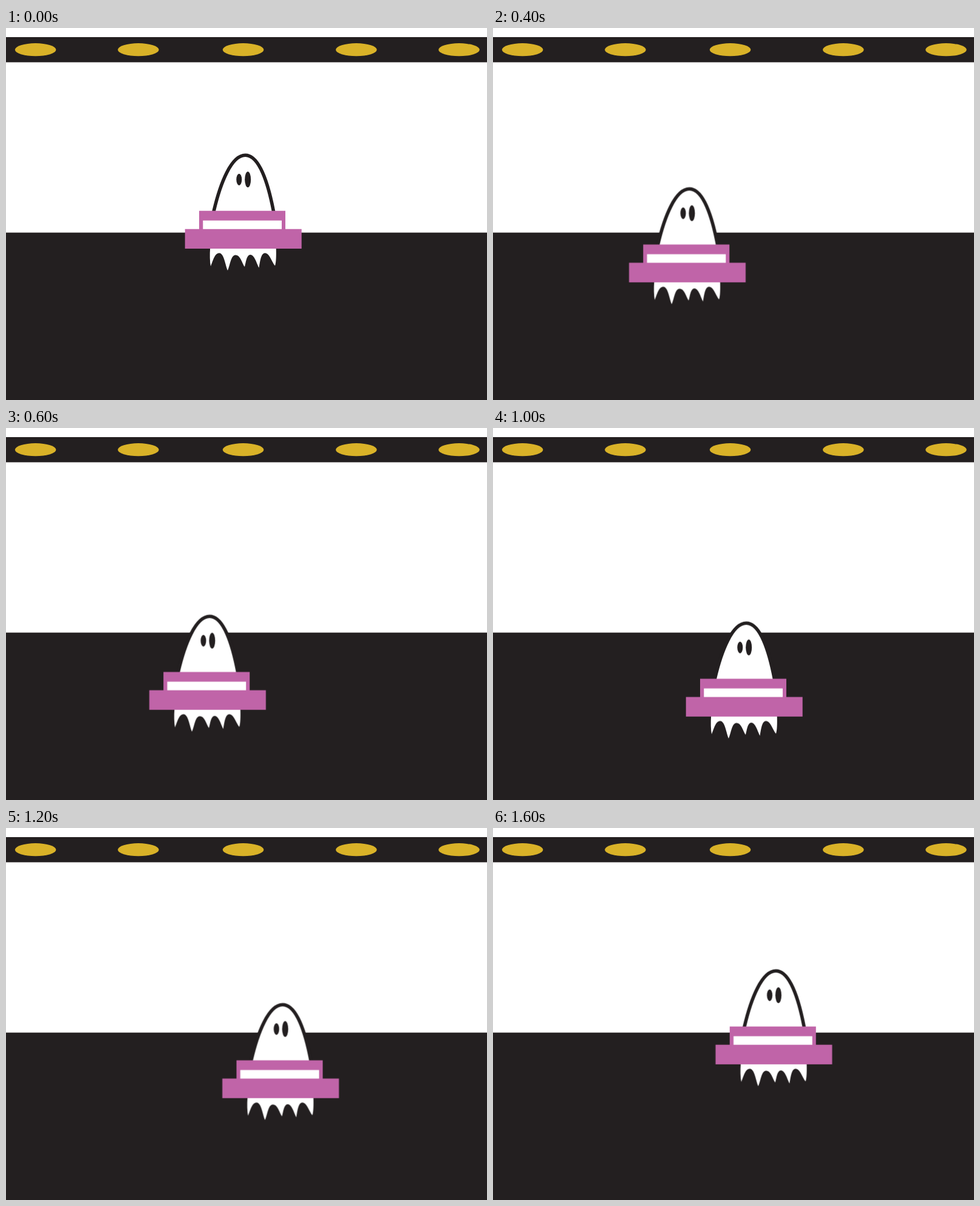
Write an HTML page that moves like this. It is 792 px wide and 612 px high and loops after 1.8 s.

```html
<!DOCTYPE html>
<html lang="en">
<head>
<meta charset="utf-8">
<title>Floating ghost</title>
<style>
  html, body { margin: 0; width: 100%; height: 100%; overflow: hidden; background: #fff; }
  svg { display: block; width: 792px; height: 612px; }
  .ink { fill: #231f20; }
  .lamp { fill: #d9b228; }
  .hat { fill: #c064a8; }
  .sheet { fill: #fff; }
  .outline { fill: #fff; stroke: #231f20; stroke-width: 5.6; }
</style>
</head>
<body>
<svg viewBox="0 0 792 612">
  <rect class="ink" y="15" width="792" height="41.4"/>
  <g id="lamps" class="lamp"></g>
  <rect class="ink" y="336.6" width="792" height="275.4"/>
  <g id="ghost">
    <path class="outline" d="M342.2 301C353 255 371 209.3 394 209.3S431.5 255 440.4 301V310H342.2Z"/>
    <ellipse class="ink" cx="383.8" cy="249.3" rx="4.5" ry="9.6"/>
    <ellipse class="ink" cx="398.2" cy="249.3" rx="5" ry="13"/>
    <path class="sheet" d="M336.3 360Q334.8 380 337 392C340 386 343 370.3 351 370.3S361 390 365 399C369 391 370 373.6 378 373.6S389 388 393 393C395 386 396 373 402.5 373S413 388 416.5 394.5C418 388 419 370.3 426.5 370.3S438 386 443 391Q445.5 383 444.6 360Z"/>
    <path class="hat" d="M318 300.7H460V330.8H486.7V362.9H294.7V330.8H318Z"/>
    <rect class="sheet" x="324.3" y="316.7" width="129.7" height="14.1"/>
  </g>
</svg>
<script>
  const lamps = document.getElementById('lamps');
  for (const cx of [48.6, 217.9, 390.6, 576.8, 746]) {
    const lamp = document.createElementNS(lamps.namespaceURI, 'ellipse');
    const attrs = { cx, cy: 35.7, rx: 33.8, ry: 10.6 };
    for (const key in attrs) lamp.setAttribute(key, attrs[key]);
    lamps.append(lamp);
  }

  // Offsets from the starting pose, each held for one step.
  const STEP = 200;
  const path = [
    [0, 0], [-43.5, 21], [-70.7, 55.4], [-58.8, 100.6], [-10.8, 127.3],
    [23, 111.7], [61.5, 81.4], [91, 55], [71.7, 25.8]
  ];
  const pose = ([x, y], i) => ({
    transform: `translate(${x}px, ${y}px)`,
    offset: i / path.length,
    easing: 'step-end'
  });
  document.getElementById('ghost').animate(
    [...path.map(pose), pose(path[0], path.length)],
    { duration: STEP * path.length, iterations: Infinity }
  );
</script>
</body>
</html>
```
